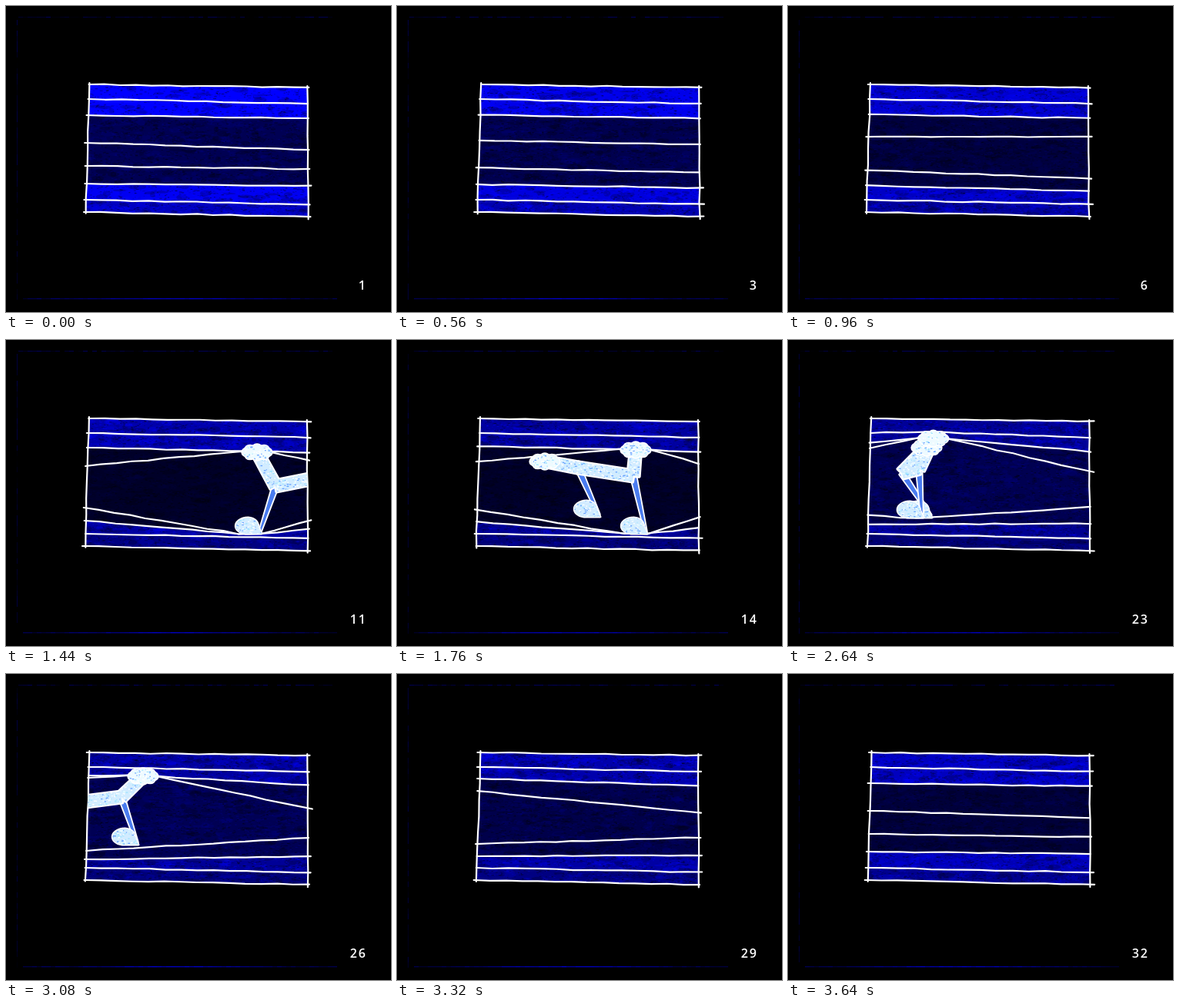
Recreate the animation shown at these times as an HTML page with a canvas. Size 500x398 px, loop 3800 ms.

```html
<!DOCTYPE html>
<html lang="en">
<head>
<meta charset="utf-8">
<title>Corridor walk</title>
<style>
html, body { margin: 0; width: 100%; height: 100%; overflow: hidden; background: #000; }
canvas { display: block; width: 500px; height: 398px; }
</style>
</head>
<body>
<canvas id="stage" width="500" height="398"></canvas>
<script>
const ctx = document.getElementById('stage').getContext('2d');
const LOOP = 3800, COUNT = 32;

// Drawings last 80 ms unless held
const LONG = [4, 5, 10, 13, 19, 24, 25, 29, 32], MEDIUM = [16, 17, 23];
const duration = n => n === 1 ? 480 : LONG.includes(n) ? 160 : MEDIUM.includes(n) ? 120 : 80;

// Heights of a line at the left and right wall: at rest, and for the bending
// ones while the walker enters and leaves
const LINES = [
  { rest: [102, 106] },
  { rest: [121, 127], pad: 9 },
  { rest: [142, 146], enter: [140, 146], leave: [132, 145], pad: 1 },
  { rest: [178, 187], enter: [164, 157], leave: [135, 176], pad: 1 },
  { rest: [208, 212], enter: [218, 234], leave: [230, 213] },
  { rest: [231, 234], enter: [235, 246], leave: [241, 237] },
  { rest: [252, 258] },
  { rest: [268, 274] }
];

// Two limb pairs take turns as pivot; speeds apply before and after the poses
const REAR = {
  enter: 32, leave: 33,
  poses: [
    { n: 11, joint: [350, 190], hand: [326, 146], heel: [332, 252] },
    { n: 14, joint: [307, 177], hand: [310, 143], heel: [325, 252] },
    { n: 19, joint: [280, 173], hand: [312, 140], heel: [319, 231] }
  ]
};
const FRONT = {
  enter: 78, leave: 33,
  poses: [
    { n: 14, joint: [235, 166], hand: [192, 158], heel: [264, 230] },
    { n: 19, joint: [197, 177], hand: [203, 122], heel: [181, 243] },
    { n: 26, joint: [150, 160], hand: [178, 133], heel: [172, 222] }
  ]
};

let seed = 1;
function rnd() {
  seed = (seed * 1664525 + 1013904223) >>> 0;
  return seed / 4294967296;
}
const spread = a => (rnd() * 2 - 1) * a;
const mix = (a, b, k) => a + (b - a) * k;
const ramp = (n, a, b) => Math.min(1, Math.max(0, (n - a) / (b - a)));
const blend = (p, q, k) => [mix(p[0], q[0], k), mix(p[1], q[1], k)];

function poseAt({ poses, enter, leave }, n) {
  const first = poses[0], last = poses[poses.length - 1];
  const i = Math.max(1, poses.findIndex(p => p.n >= n));
  const [a, b] = n > last.n ? [last, last] : [poses[i - 1], poses[i]];
  const k = a === b ? 0 : ramp(n, a.n, b.n);
  const dx = Math.max(0, first.n - n) * enter - Math.max(0, n - last.n) * leave;
  const part = name => {
    const [x, y] = blend(a[name], b[name], k);
    return [x + dx, y];
  };
  return { joint: part('joint'), hand: part('hand'), heel: part('heel') };
}

// Elastic line from a to b around obstacles; side -1 is pushed up, 1 down
function taut(a, b, obstacles, side) {
  const inside = obstacles.filter(p => p[0] > a[0] && p[0] < b[0]).sort((p, q) => p[0] - q[0]);
  const line = [a];
  for (const p of [...inside, b]) {
    while (line.length > 1) {
      const [o, m] = line.slice(-2);
      const cross = (m[0] - o[0]) * (p[1] - o[1]) - (m[1] - o[1]) * (p[0] - o[0]);
      if (cross * side < 0) break;
      line.pop();
    }
    line.push(p);
  }
  return line;
}

// Slightly shaky pen line through the points
function pen(points) {
  ctx.beginPath();
  ctx.moveTo(...points[0]);
  for (let i = 1; i < points.length; i++) {
    const a = points[i - 1], b = points[i];
    const steps = Math.ceil(Math.hypot(b[0] - a[0], b[1] - a[1]) / 22);
    for (let s = 1; s <= steps; s++) {
      const [x, y] = blend(a, b, s / steps);
      ctx.lineTo(x + spread(.6), y + spread(.6));
    }
  }
  ctx.strokeStyle = '#fff';
  ctx.lineWidth = 2.2;
  ctx.stroke();
}

function polygon(points) {
  const path = new Path2D();
  points.forEach(p => path.lineTo(...p));
  path.closePath();
  return path;
}

// Mottled blue between two lines: soft blotches, then grain
function band(upper, lower, level) {
  const area = [...upper, ...[...lower].reverse()];
  const ys = area.map(p => p[1]), top = Math.min(...ys), height = Math.max(...ys) - top;
  const blue = v => `rgb(0,0,${Math.round(255 * Math.min(1, v))})`;
  ctx.save();
  ctx.clip(polygon(area));
  ctx.fillStyle = blue(level);
  ctx.fillRect(95, top, 310, height);
  for (let i = 0; i < height * 3; i++) {
    ctx.globalAlpha = .25;
    ctx.fillStyle = blue(level * (rnd() < .5 ? .2 : 1.6));
    ctx.beginPath();
    ctx.ellipse(95 + rnd() * 305, top + rnd() * height, 3 + rnd() * 9, 1 + rnd() * 3, 0, 0, 7);
    ctx.fill();
  }
  ctx.globalAlpha = .5;
  for (let i = 0; i < height * 30; i++) {
    ctx.fillStyle = blue(level * rnd() * 1.8);
    ctx.fillRect(95 + rnd() * 305, top + rnd() * height, 1 + rnd() * 3, 1);
  }
  ctx.restore();
}

function limb(a, b, wa, wb) {
  const len = Math.hypot(b[0] - a[0], b[1] - a[1]) || 1;
  const nx = (a[1] - b[1]) / len / 2, ny = (b[0] - a[0]) / len / 2;
  return polygon([
    [a[0] + nx * wa, a[1] + ny * wa], [b[0] + nx * wb, b[1] + ny * wb],
    [b[0] - nx * wb, b[1] - ny * wb], [a[0] - nx * wa, a[1] - ny * wa]
  ]);
}

function fist([x, y]) {
  const path = new Path2D();
  for (let i = 0; i < 8; i++) {
    const a = i * Math.PI / 4, cx = x + Math.cos(a) * 13, cy = y + Math.sin(a) * 5;
    path.moveTo(cx + 6, cy);
    path.ellipse(cx, cy, 6, 5, 0, 0, 2 * Math.PI);
  }
  return path;
}

function foot([x, y]) {
  const w = 35, path = new Path2D();
  path.moveTo(x, y);
  path.lineTo(x - w * .6, y);
  path.bezierCurveTo(x - w * 1.1, y - 2, x - w * 1.1, y - 20, x - w * .5, y - 21);
  path.quadraticCurveTo(x - w * .15, y - 20, x - 4, y - 9);
  path.closePath();
  return path;
}

// White joint outline, then chalky filling
function chalk(paths, [x, y, w, h], fill, edge = 4.4) {
  ctx.strokeStyle = '#fff';
  ctx.lineWidth = edge;
  paths.forEach(p => ctx.stroke(p));
  const whole = new Path2D();
  paths.forEach(p => whole.addPath(p));
  ctx.save();
  ctx.fillStyle = fill;
  paths.forEach(p => ctx.fill(p));
  ctx.clip(whole);
  for (let i = 0; i < w * h / 9; i++) {
    ctx.fillStyle = ['#fff', '#fff', '#9fe4ff', '#69a4ff', '#e4ffff'][rnd() * 5 | 0];
    ctx.fillRect(x + rnd() * w, y + rnd() * h, 1 + rnd() * 2, 1.3);
  }
  ctx.restore();
}

function walker(pairs) {
  const [a, b] = pairs;
  for (const { joint, heel } of pairs) {
    chalk([limb(joint, [heel[0] - 2, heel[1] - 3], 7, 2)], [0, 0, 0, 0], '#4a7cf0', 3.6);
    chalk([foot(heel)], [heel[0] - 38, heel[1] - 22, 40, 24], '#d2ecff', 3);
  }
  chalk([limb(a.joint, b.joint, 15, 15), ...pairs.map(p => limb(p.joint, p.hand, 15, 14))],
    [100, 110, 300, 100], '#d2ecff');
  for (const { hand } of pairs) {
    chalk([fist(hand)], [hand[0] - 20, hand[1] - 11, 40, 22], '#eefaff', 3.4);
  }
}

// Faint rough edges of the paper
function paper() {
  for (let x = 16; x < 420; x += 6) {
    ctx.fillStyle = `rgba(0,0,160,${rnd() * .6})`;
    ctx.fillRect(x, 14, 6, 1);
    const mid = Math.exp(-(((x - 210) / 120) ** 2));
    ctx.fillStyle = `rgba(0,0,255,${.1 + mid * .5 + rnd() * .2})`;
    ctx.fillRect(x + 6, 380, 6, 1.4);
  }
  for (let y = 18; y < 376; y += 7) {
    ctx.fillStyle = `rgba(0,0,150,${rnd() * .45})`;
    ctx.fillRect(14, y, 1, 7);
  }
}

function label(n) {
  ctx.font = '600 16px "Open Sans", sans-serif';
  ctx.textAlign = 'right';
  ctx.fillStyle = '#fff';
  ctx.letterSpacing = '2px';
  ctx.fillText(n, 469, 369);
}

function draw(n) {
  seed = n * 7919 + 17;
  for (let i = 0; i < 5; i++) rnd();
  ctx.fillStyle = '#000';
  ctx.fillRect(0, 0, 500, 398);
  ctx.lineJoin = ctx.lineCap = 'round';
  paper();

  const shift = spread(1.2);
  const left = y => mix(108, 103, (y - 102) / 166) + shift;
  const right = y => mix(391, 392, (y - 106) / 168) + shift;
  const pairs = [poseAt(REAR, n), poseAt(FRONT, n)];
  const strain = Math.min(ramp(n, 1, 10), ramp(n, 32, 27)), progress = ramp(n, 11, 26);

  const lines = LINES.map(({ rest, enter = rest, leave = rest, pad }, i) => {
    const [l, r] = blend(rest, blend(enter, leave, progress), strain);
    const top = i < 4, obstacles = [];
    if (top && pad) pairs.forEach(({ hand: [x, y] }) => obstacles.push([x - 20, y - pad], [x + 20, y - pad + 1]));
    if (!top) pairs.forEach(({ heel: [x, y] }) => obstacles.push([x - 30, y], [x, y]));
    return taut([left(l), l], [right(r), r], obstacles, top ? -1 : 1);
  });

  const high = .58 + .42 * ((n - 20) / 19) ** 2, mid = .24 + .09 * Math.cos(n / 4);
  [high, high, mid, mid, mid, high * .95, high * .75].forEach((v, i) => band(lines[i], lines[i + 1], v));

  lines.forEach(line => {
    const a = line[0], b = line[line.length - 1];
    pen([[a[0] - rnd() * 4, a[1]], ...line.slice(1, -1), [b[0] + rnd() * 6, b[1]]]);
  });
  const walls = [[left(100), 100], [right(104), 104], [right(277), 277], [left(270), 270]];
  pen([walls[0], walls[3]]);
  pen([walls[1], walls[2]]);

  ctx.save();
  ctx.clip(polygon(walls));
  walker(pairs);
  ctx.restore();
  label(n);
}

let shown = 0;
function tick() {
  let t = performance.now() % LOOP, n = 1;
  while (n < COUNT && t >= duration(n)) t -= duration(n++);
  if (n !== shown) draw(shown = n);
  requestAnimationFrame(tick);
}
tick();
</script>
</body>
</html>
```
